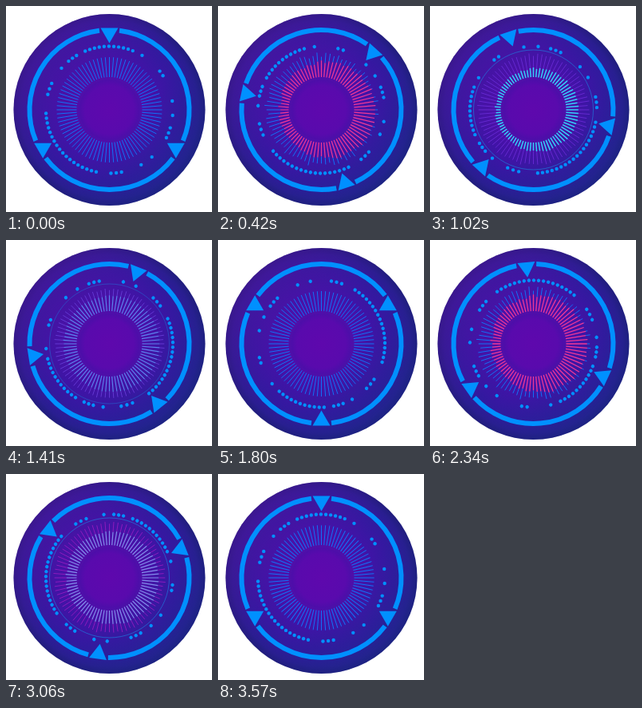
Recreate the animation shown at these times as an HTML page. Size 258 px wide and 258 px high, loop 3600 ms.

```html
<!DOCTYPE html>
<html lang="en">
<head>
<meta charset="utf-8">
<title>Rotating dial</title>
<style>
  html, body { margin: 0; width: 100%; height: 100%; overflow: hidden; background: #fff; }
  svg { display: block; width: 100vw; height: 100vh; }
</style>
</head>
<body>
<svg viewBox="0 0 258 258">
  <defs>
    <radialGradient id="disc">
      <stop offset="0" stop-color="#5a0caa"/>
      <stop offset=".3" stop-color="#500eaa"/>
      <stop offset=".55" stop-color="#3f14a6"/>
      <stop offset=".8" stop-color="#311a9e"/>
      <stop offset=".93" stop-color="#291e90"/>
      <stop offset="1" stop-color="#201d7c"/>
    </radialGradient>
    <linearGradient id="tint" x1=".15" y1=".15" x2=".85" y2=".85">
      <stop offset="0" stop-color="#5c10a4" stop-opacity=".45"/>
      <stop offset=".5" stop-color="#5c10a4" stop-opacity="0"/>
      <stop offset=".6" stop-color="#182c8c" stop-opacity="0"/>
      <stop offset="1" stop-color="#182c8c" stop-opacity=".4"/>
    </linearGradient>
    <radialGradient id="core">
      <stop offset="0" stop-color="#5e08ad"/>
      <stop offset=".8" stop-color="#590aad"/>
      <stop offset="1" stop-color="#4c0ea9"/>
    </radialGradient>
  </defs>
  <g transform="translate(129.5 130)">
    <circle r="120" fill="url(#disc)"/>
    <circle r="120" fill="url(#tint)"/>
    <circle r="38" fill="url(#core)"/>
    <path id="outer" fill="none" stroke-width="1"/>
    <path id="inner" fill="none"/>
    <circle id="halo" r="75" fill="none" stroke="#1b86e6" stroke-width=".8"/>
    <g id="dots" fill="#0090ff"></g>
    <g id="ring" fill="#0090ff"></g>
  </g>
</svg>
<script>
const FRAME = 30, LOOP = 3600, PULSE = 1800, RAYS = 80;
const el = id => document.getElementById(id);

// Angles run clockwise from the top.
function polar(r, deg) {
  const a = deg * Math.PI / 180;
  return (r * Math.sin(a)).toFixed(2) + " " + (-r * Math.cos(a)).toFixed(2);
}

function add(parent, name, attrs) {
  const node = document.createElementNS("http://www.w3.org/2000/svg", name);
  for (const key in attrs) node.setAttribute(key, attrs[key]);
  parent.appendChild(node);
}

// Linear interpolation over [time, value] pairs; a value is a number or an RGB list.
function track(keys, t) {
  let i = 1;
  while (i < keys.length - 1 && t > keys[i][0]) i++;
  const [t0, a] = keys[i - 1], [t1, b] = keys[i];
  const u = Math.min(1, Math.max(0, (t - t0) / (t1 - t0)));
  const mix = (x, y) => x + (y - x) * u;
  return Array.isArray(a) ? a.map((x, k) => mix(x, b[k])) : mix(a, b);
}

const run = (start, count, step = 4.4) =>
  Array.from({ length: count }, (_, i) => start + i * step);

const dotAngles = [
  ...run(-40, 3), ...run(-22.4, 11), 31, ...run(52.5, 2, 5), 82, 95, ...run(106.5, 3, 4.8),
  138, 150, ...run(169, 3, 4.8), ...run(192, 18), ...run(284, 3, 5.3), 311
];
for (const deg of dotAngles) {
  const [cx, cy] = polar(79.5, deg).split(" ");
  add(el("dots"), "circle", { cx, cy, r: 2.2 });
}

for (const deg of [0, 120, 240]) {
  add(el("ring"), "path", {
    d: `M${polar(100, deg + 7.2)}A100 100 0 0 1 ${polar(100, deg + 112.8)}`,
    fill: "none", stroke: "#0090ff", "stroke-width": 6
  });
  add(el("ring"), "path", { d: "M-11 -102.5H11L0 -83.5Z", transform: `rotate(${deg})` });
}

const BLUE = [18, 112, 246], PINK = [240, 56, 150], CYAN = [52, 206, 250];
const LILAC = [130, 140, 236], PURPLE = [100, 40, 208], MAGENTA = [140, 26, 190];

const ringTurn = [[0, 0], [60, 180], [119, 360]];
const dotTurn = [[0, 0], [60, -160], [102, -316], [119, -360]];
const innerEnd = [[0, 66], [300, 60], [540, 60], [1020, 52], [1260, 58], [1800, 66]];
const outerEnd = [[0, 66], [420, 69], [1260, 69], [1800, 66]];
const unevenness = [[0, 0], [350, 1], [600, 1], [1020, .6], [1260, .5], [1800, 0]];
const innerColor = [[0, BLUE], [100, BLUE], [380, PINK], [600, PINK], [960, CYAN], [1080, CYAN], [1260, LILAC], [1700, BLUE], [1800, BLUE]];
const outerColor = [[0, BLUE], [600, BLUE], [960, PURPLE], [1080, PURPLE], [1260, MAGENTA], [1700, BLUE], [1800, BLUE]];
const innerWidth = [[0, 1], [420, 1.2], [1020, 1.5], [1260, 1.2], [1800, 1]];
const haloAlpha = [[0, 0], [650, 0], [950, .75], [1300, .75], [1650, 0], [1800, 0]];

// Repeatable noise between -1 and 1.
const noise = i => 2 * (Math.abs(Math.sin(i * 12.9898) * 43758.5453) % 1) - 1;

function drawRays(p) {
  const split = track(innerEnd, p), reach = track(outerEnd, p), uneven = track(unevenness, p);
  let inner = "", outer = "";
  for (let i = 0; i < RAYS; i++) {
    const deg = i * 360 / RAYS;
    // Inner rays are longest on the right.
    const mid = split + uneven * (7 * Math.sin(deg * Math.PI / 180) + 2 * noise(i + 1));
    const end = reach + uneven * 3 * noise(i + 101);
    inner += `M${polar(41, deg)}L${polar(mid, deg)}`;
    if (end > mid) outer += `M${polar(mid, deg)}L${polar(end, deg)}`;
  }
  const rgb = keys => `rgb(${track(keys, p).map(Math.round)})`;
  el("inner").setAttribute("d", inner);
  el("inner").setAttribute("stroke", rgb(innerColor));
  el("inner").setAttribute("stroke-width", track(innerWidth, p));
  el("outer").setAttribute("d", outer);
  el("outer").setAttribute("stroke", rgb(outerColor));
}

function draw(ms) {
  const step = Math.floor(ms % LOOP / FRAME);
  const p = step * FRAME % PULSE;
  el("ring").setAttribute("transform", `rotate(${track(ringTurn, step)})`);
  el("dots").setAttribute("transform", `rotate(${track(dotTurn, step)})`);
  drawRays(p);
  el("halo").setAttribute("opacity", track(haloAlpha, p));
}

const start = performance.now();
function tick() {
  draw(performance.now() - start);
  requestAnimationFrame(tick);
}
tick();
</script>
</body>
</html>
```
